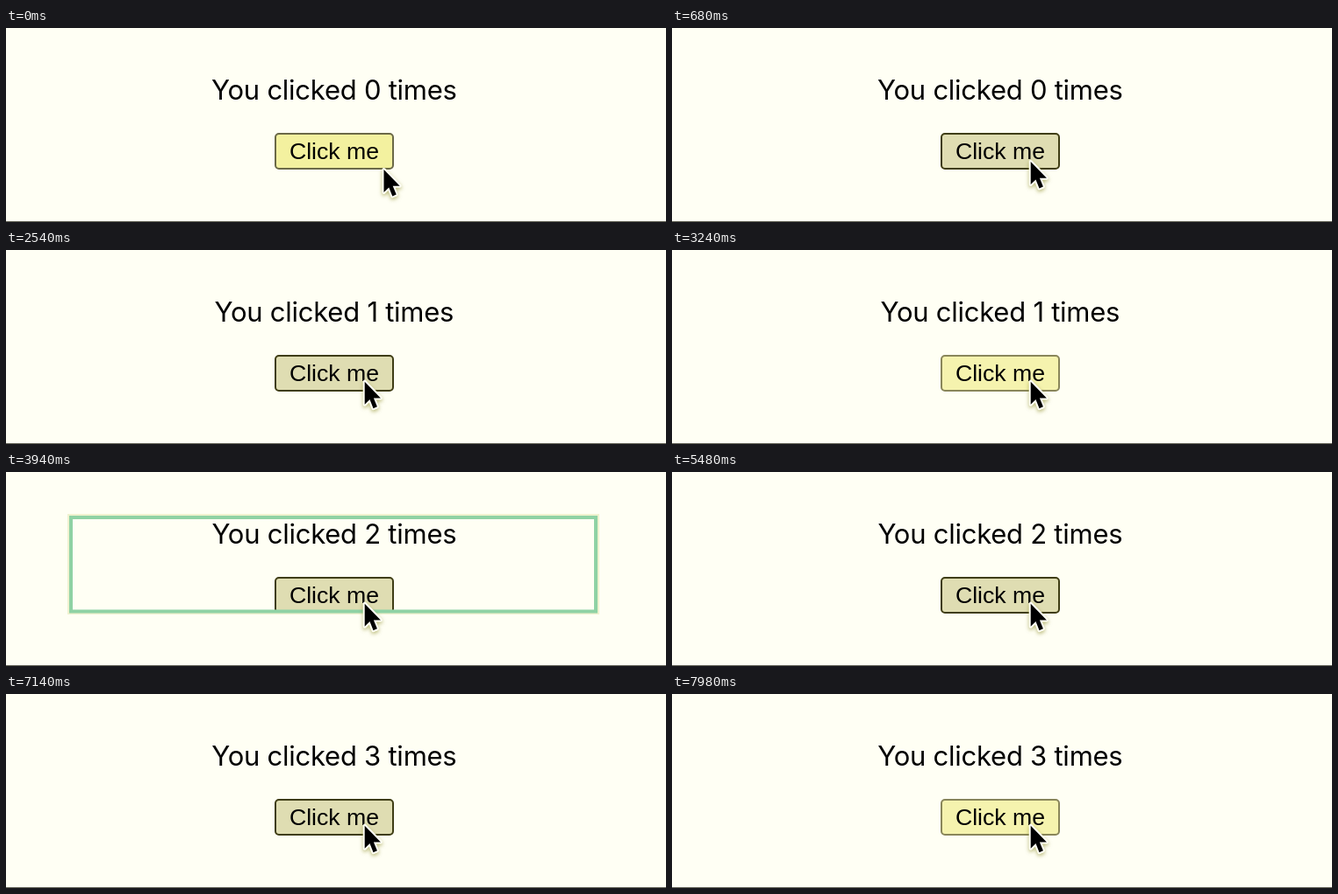
These frames come from a looping animation (752x222 px, 8000 ms). An HTML page with a canvas:

```html
<!DOCTYPE html>
<html>
<head>
<meta charset="utf-8">
<style>
  html, body { margin: 0; width: 752px; height: 222px; overflow: hidden; background: #fffff4; }
  canvas { display: block; }
</style>
</head>
<body>
<canvas id="stage" width="752" height="222"></canvas>
<script>
const ctx = document.getElementById('stage').getContext('2d');
const LOOP = 8000;

const BUTTON = {
  idle: { fill: '#f3f19f', line: '#6b6947' },
  hover: { fill: '#dfddb2', line: '#3f3d14' },
  pressed: { fill: '#f5f3ae', line: '#89865a' }
};

// Each click: press, release (count goes up, outline appears), outline ends.
const CLICKS = [
  { press: 1420, release: 1820, clear: 2500 },
  { press: 3000, release: 3360, clear: 4060 },
  { press: 5580, release: 5860, clear: 6560 },
  { press: 7760, release: 8200, clear: 8900 }
];

// time, x, y of the pointer's tip
const PATH = [
  [0, 430.5, 162], [20, 430.5, 162], [240, 427, 167], [460, 415, 160],
  [680, 408.7, 153], [979, 408.7, 153], [980, 408.7, 152],
  [1120, 408.7, 151.5], [1240, 408.7, 150.7], [LOOP, 408.7, 150.7]
];

function pointerAt(t) {
  const i = PATH.findIndex(p => p[0] > t);
  const [t0, x0, y0] = PATH[i - 1], [t1, x1, y1] = PATH[i];
  const k = (t - t0) / (t1 - t0);
  return [x0 + (x1 - x0) * k, y0 + (y1 - y0) * k];
}

function text(str, y, font, spacing) {
  ctx.font = font;
  ctx.letterSpacing = spacing + 'px';
  ctx.fillStyle = '#000';
  ctx.fillText(str, 374 + spacing / 2, y);
}

function drawButton({ fill, line }) {
  ctx.beginPath();
  ctx.roundRect(307, 121, 134, 40, 4);
  ctx.fillStyle = fill;
  ctx.fill();
  ctx.lineWidth = 2;
  ctx.strokeStyle = line;
  ctx.stroke();
  text('Click me', 150, '26.67px "Liberation Sans", Arial, sans-serif', 0);
}

function drawOutline() {
  ctx.lineWidth = 2;
  ctx.strokeStyle = '#f0f2cf';
  ctx.strokeRect(71, 49, 604, 113);
  ctx.lineWidth = 4;
  ctx.strokeStyle = '#8fd2a4';
  ctx.strokeRect(74, 52, 598, 107.5);
}

function drawPointer(x, y) {
  const arrow = new Path2D('M0 0V26L5.8 20.4L9.8 30.5L14.2 28.6L10.2 18.7H18.2Z');
  ctx.save();
  ctx.translate(x, y);
  ctx.lineJoin = 'round';
  ctx.lineWidth = 4;
  ctx.strokeStyle = '#fffff4';
  ctx.shadowColor = 'rgba(120,120,0,.5)';
  ctx.shadowBlur = 4;
  ctx.shadowOffsetY = 2;
  ctx.stroke(arrow);
  ctx.shadowColor = 'transparent';
  ctx.fillStyle = '#000';
  ctx.fill(arrow);
  ctx.restore();
}

function draw(t) {
  const [x, y] = pointerAt(t);
  const count = CLICKS.filter(c => t >= c.release).length;
  const pressed = CLICKS.some(c => t >= c.press && t < c.release);
  const hover = x < 442 && y < 161.5;

  ctx.fillStyle = '#fffff4';
  ctx.fillRect(0, 0, 752, 222);
  ctx.fillStyle = '#66665a';
  ctx.fillRect(0, 221, 752, 1);
  ctx.textAlign = 'center';
  text(`You clicked ${count} times`, 82, '31px Inter, sans-serif', -0.25);
  drawButton(BUTTON[pressed ? 'pressed' : hover ? 'hover' : 'idle']);
  if (CLICKS.some(c => t >= c.release && t < c.clear)) drawOutline();
  drawPointer(x, y);
}

const start = performance.now();
function tick() {
  draw((performance.now() - start) % LOOP);
  requestAnimationFrame(tick);
}
tick();
</script>
</body>
</html>
```
